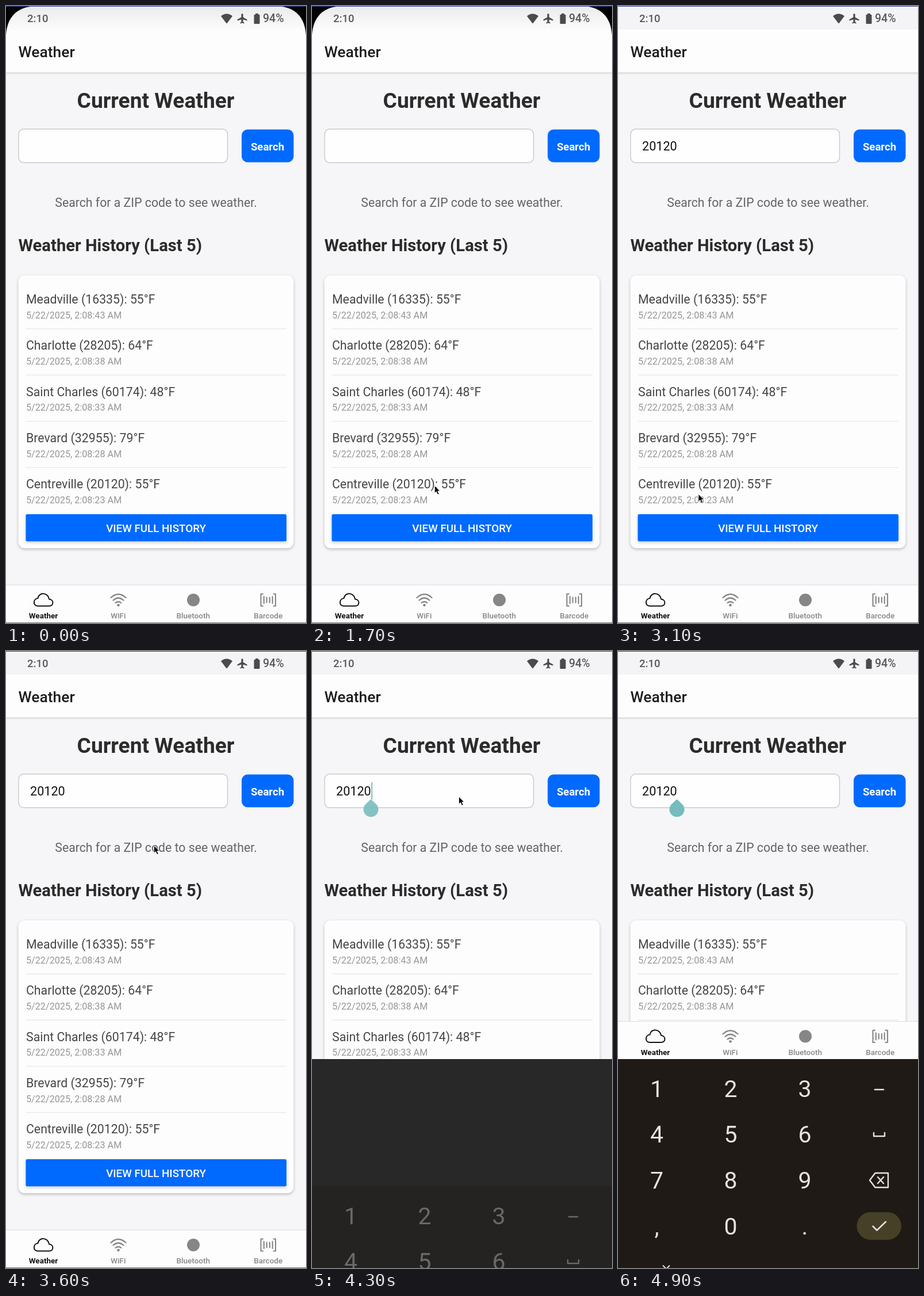
An HTML page for the animation above (5 s loop, 522 px wide and 1072 px high).

```html
<!DOCTYPE html>
<html lang="en">
<head>
<meta charset="utf-8">
<title>Weather</title>
<style>
  html, body { margin: 0; width: 100%; height: 100%; overflow: hidden; background: #f6f5f7; }
  svg { display: block; width: 522px; height: 1072px; font-family: Roboto, sans-serif; }
  .line { fill: none; stroke-linecap: round; stroke-linejoin: round; }
  .card { filter: drop-shadow(0 2px 2.5px rgba(0, 0, 0, .24)); }
  .bar { filter: drop-shadow(0 1px 1.5px rgba(0, 0, 0, .22)); }
</style>
</head>
<body>
<svg id="stage" viewBox="0 0 522 1072" xmlns="http://www.w3.org/2000/svg"></svg>
<script>
const LOOP = 5000, STEP = 100;
const CUT = 2700, FOCUS = 4300, RESIZED = 4400;
const BLUE = '#006aff', TEAL = '#74bcbd', KEY = '#e6e3df';

const text = (x, y, size, fill, label, weight = 400, anchor = 'start') =>
  `<text x="${x}" y="${y}" font-size="${size}" fill="${fill}" font-weight="${weight}" text-anchor="${anchor}">${label}</text>`;
const rect = (x, y, w, h, fill, r = 0, extra = '') =>
  `<rect x="${x}" y="${y}" width="${w}" height="${h}" rx="${r}" fill="${fill}" ${extra}/>`;
const line = (d, color, width) =>
  `<path class="line" d="${d}" stroke="${color}" stroke-width="${width}"/>`;

function statusBar() {
  return `<defs><linearGradient id="fade" x2="0" y2="1">
      <stop stop-color="#ebebed"/><stop offset="1" stop-color="#fcfcfc"/></linearGradient></defs>`
    + rect(0, 0, 522, 41, '#f4f4f6')
    + `<g id="corners">${rect(0, 0, 522, 42, 'url(#fade)')}
        <path d="M0 0H52C20 1 2 18 0 51ZM522 0H470C502 1 520 18 522 51Z"/></g>`
    + rect(0, 0, 522, 1, '#2d3f9e')
    + text(37, 28, 18.5, '#58585a', '2:10', 500)
    + `<g fill="#4b4b4d">
        <path d="M374 17.500Q384 9.500 394 17.500L385 29.500Q384 30.500 383 29.500Z"/>
        <path d="M409.400 14.500Q411 11.500 412.600 14.500V19.500L419.500 23.500V25.500L412.600 23.500V27.500L414.500 29V30.500L411 29.500L407.500 30.500V29L409.400 27.500V23.500L402.500 25.500V23.500L409.400 19.500Z"/>
        <path d="M434 13H439V15H440.500Q441.500 15 441.500 16V30Q441.500 31 440.500 31H432.500Q431.500 31 431.500 30V16Q431.500 15 432.500 15H434Z"/></g>`
    + text(447, 28, 19.5, '#58585a', '94%', 500);
}

function history() {
  const rows = [
    ['Meadville (16335): 55°F', 43], ['Charlotte (28205): 64°F', 38],
    ['Saint Charles (60174): 48°F', 33], ['Brevard (32955): 79°F', 28],
    ['Centreville (20120): 55°F', 23]
  ];
  return rect(21.5, 468, 479, 474, '#fdfdfd', 11, 'class="card"')
    + rows.map(([place, sec], i) => {
      const y = 80.3 * i;
      return text(35, 517 + y, 21.3, '#464646', place)
        + text(35, 542.7 + y, 16.2, '#969696', `5/22/2025, 2:08:${sec} AM`)
        + (i < 4 ? rect(35, 560.2 + y, 453, 1.4, '#e9e9e9') : '');
    }).join('')
    + rect(34.5, 883, 453.5, 47, BLUE, 2.5, 'class="card"')
    + text(261, 914, 18.8, '#fff', 'VIEW FULL HISTORY', 500, 'middle');
}

function tabBar() {
  const gray = '#868688';
  const icons = [
    line('M55 1042.500H75C83.500 1042.500 83.500 1031 75 1030.500C73.500 1018.500 57 1018 55.500 1029C47 1030 46.500 1042 55 1042.500Z', '#111', 2),
    line('M182.500 1028Q195.500 1016 208.500 1028M186.500 1032.500Q195.500 1024.500 204.500 1032.500M190.500 1037Q195.500 1033 200.500 1037', gray, 2.2)
      + `<circle cx="195.500" cy="1041" r="2.300" fill="${gray}"/>`,
    `<circle cx="326" cy="1032" r="11" fill="${gray}"/>`,
    line('M447 1021.500H443.500V1042.500H447M465.500 1021.500H469V1042.500H465.500M448.800 1026V1038M453.700 1027.500V1036.500M458.800 1027.500V1036.500M463.700 1026V1038', gray, 2.1)
  ];
  const labels = ['Weather', 'WiFi', 'Bluetooth', 'Barcode'];
  return rect(0, 1006, 522, 66, '#fdfdfd') + rect(0, 1005.5, 522, 1, '#dcdcde')
    + labels.map((label, i) => icons[i]
      + text(65 + 130.4 * i, 1064, 13.5, i ? gray : '#111', label, i ? 500 : 700, 'middle')).join('');
}

function keyboard() {
  const columns = [67.5, 196, 325, 454];
  const keys = ['123', '456', '789', ',0.'].map((row, r) =>
    [...row].map((k, c) => text(columns[c], 774.5 + 79.7 * r, 41, KEY, k, 400, 'middle')).join('')).join('');
  return rect(0, 709, 522, 363, '#1f1a15') + keys
    + line('M447 762H462', KEY, 2.6)
    + line('M445 837V843H464V837', KEY, 2.4)
    + line('M447.500 907H470V932H447.500L438 919.500ZM452 914L462 925M462 914L452 925', KEY, 2.4)
    + rect(415.5, 975, 77.5, 48, '#454027', 24)
    + line('M443.500 999.500L450.500 1006.500L466 991.500', KEY, 2.5)
    + line('M78.500 1068L84 1073.500L89.500 1068', KEY, 2);
}

stage.innerHTML =
  rect(0, 0, 522, 1072, '#f6f5f7')
  + rect(0, 41, 522, 74.5, '#fdfdfd', 0, 'class="bar"')
  + statusBar()
  + text(21.5, 89, 26.4, '#1c1c1e', 'Weather', 500)
  + text(260.5, 176.5, 37.2, '#2b2b2b', 'Current Weather', 700, 'middle')
  + rect(22, 213.7, 363.5, 58.6, '#fefefe', 9, 'stroke="#c9c9cb" stroke-width="1.4"')
  + text(42, 251, 21.6, '#111', '20120').replace('<text', '<text id="zip"')
  + rect(410, 214.5, 90.5, 57, BLUE, 10.5)
  + text(455, 250.5, 18.6, '#fff', 'Search', 700, 'middle')
  + text(261, 348.6, 21.26, '#646466', 'Search for a ZIP code to see weather.', 400, 'middle')
  + text(21.5, 425.7, 29.2, '#2b2b2b', 'Weather History (Last 5)', 700)
  + history()
  + `<g id="tabs">${tabBar()}</g>`
  + rect(0, 1071, 522, 1, '#777')
  + `<g id="panel">${rect(0, 709, 522, 363, '#282828')}<g id="keys">${keyboard()}</g></g>`
  + rect(103.2, 228, 1.9, 30, TEAL, 0, 'id="caret"')
  + `<path id="handle" fill="${TEAL}" d="M102.500 257.500L111.800 266.200A13 13 0 1 1 93.200 266.200Z"/>`
  + `<path id="pointer" stroke="#fff" stroke-width=".8" d="M0 0V13L3 10.300L5.300 15.500L7.700 14.500L5.400 9.500H9.300Z"/>`;

const el = id => document.getElementById(id);
const show = (id, on) => el(id).setAttribute('visibility', on ? 'visible' : 'hidden');
const move = (id, x, y) => el(id).setAttribute('transform', `translate(${x} ${y})`);

// Pointer stops: time, x, y
const stops = [
  [700, 259.5, 328], [1300, 259.5, 328], [1800, 208, 892], [2400, 175.5, 845.5],
  [3100, 140, 848], [3600, 257.5, 338], [4000, 255.5, 253], [LOOP, 255.5, 253]
];

function pointerAt(t) {
  const i = Math.max(1, stops.findIndex(s => s[0] > t));
  const [t0, x0, y0] = stops[i - 1], [t1, x1, y1] = stops[i];
  const p = Math.min(1, Math.max(0, (t - t0) / (t1 - t0)));
  const e = p * p * (3 - 2 * p);
  return [x0 + (x1 - x0) * e, y0 + (y1 - y0) * e];
}

function render(t) {
  show('corners', t < CUT);
  show('zip', t >= CUT);
  show('pointer', t >= 700 && t < 4900);
  move('pointer', ...pointerAt(t));

  const open = t >= FOCUS;
  show('panel', open);
  show('handle', open);
  show('caret', open && t < 4800);
  el('handle').setAttribute('opacity', t < RESIZED ? .88 : 1);
  move('tabs', 0, t >= RESIZED ? -362.5 : 0);

  const slide = t < 4700 ? 221 * Math.exp((FOCUS - t) / 61) : 0;
  move('keys', 0, slide);
  el('keys').setAttribute('opacity', t < RESIZED ? .35 : 1);
}

function tick() {
  const t = performance.now() % LOOP;
  render(Math.floor(t / STEP) * STEP);
  requestAnimationFrame(tick);
}
tick();
</script>
</body>
</html>
```
